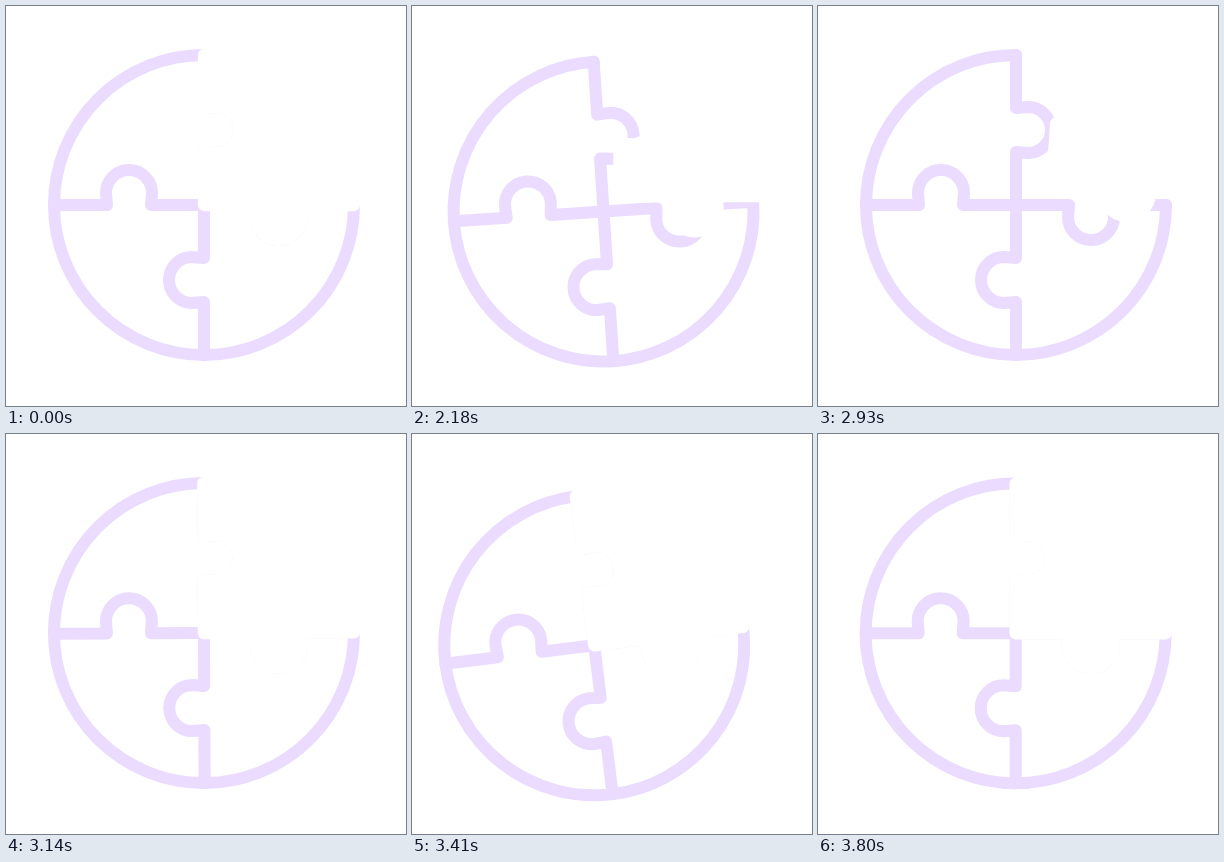
An HTML page for the animation above (3.83 s loop, 400x400 px).

```html
<!DOCTYPE html>
<html lang="en">
<head>
<meta charset="utf-8">
<title>Puzzle circle</title>
<style>
  html, body { margin: 0; width: 100%; height: 100%; overflow: hidden; background: #fff; }
  svg { display: block; width: 100%; height: 100%; stroke-width: 12; stroke-linejoin: round; stroke-linecap: round; }
  #board { fill: none; stroke: #eadbff; }
  #piece { fill: #fff; stroke: #fff; stroke-width: 12.3; }
</style>
</head>
<body>
<svg viewBox="0 0 400 400">
  <defs>
    <path id="arm" d="M0 0H-53L-52-12A23 23 0 0 0-98-12L-97 0H-150"/>
  </defs>
  <g id="board">
    <path d="M0-150A150 150 0 1 0 150 0"/>
    <use href="#arm"/>
    <use href="#arm" transform="rotate(90)"/>
    <use href="#arm" transform="rotate(180)"/>
    <use href="#arm" transform="rotate(270)"/>
  </g>
  <path id="piece" d="M0 0V-53L12-52A23 23 0 0 0 12-98L0-97V-150A150 150 0 0 1 150 0H97L98 12A23 23 0 0 1 52 12L53 0Z"/>
</svg>
<script>
const LOOP = 3830, START = 2030, STEP = 30;
const PULL = 2000, LIFT = 2570, SNAP = 3110, REST = 3800;
const board = document.getElementById('board');
const piece = document.getElementById('piece');

const progress = (t, from, to) => Math.min(1, Math.max(0, (t - from) / (to - from)));
const smooth = u => u * u * (3 - 2 * u);
const arch = u => Math.sin(Math.PI * u);

// Rises to 1 after `rise` ms, then dies away
function pulse(t, rise, sharpness) {
  const s = Math.max(0, t / rise);
  return (s * Math.exp(1 - s)) ** sharpness;
}

function place(el, x, y, angle) {
  el.setAttribute('transform', `translate(${198 + x} ${199 + y}) rotate(${angle})`);
}

function draw(now) {
  const t = START + STEP * Math.floor((now % LOOP - START) / STEP);

  // The whole puzzle recoils when the piece leaves and when it snaps back
  const pull = pulse(t - PULL, 103, 2.3);
  const snap = pulse(t - SNAP, 240, 4.9);
  const swing = arch(progress(t, SNAP, REST) ** 1.5);
  const x = -10 * pull - 18 * snap;
  const y = 10 * pull + 14 * snap;
  const angle = -5.8 * pull - 9 * swing;
  place(board, x, y, angle);

  // The piece pops out, drifts away and returns
  const out = t > SNAP ? 0 : smooth(progress(t, 2090, 2180));
  const drift = arch(progress(t, LIFT, SNAP));
  place(piece, x + 16 * out + 24 * drift, y - 15 * out - 16 * drift, angle + 3.6 * out);
}

function tick() {
  draw(performance.now());
  requestAnimationFrame(tick);
}
tick();
</script>
</body>
</html>
```
